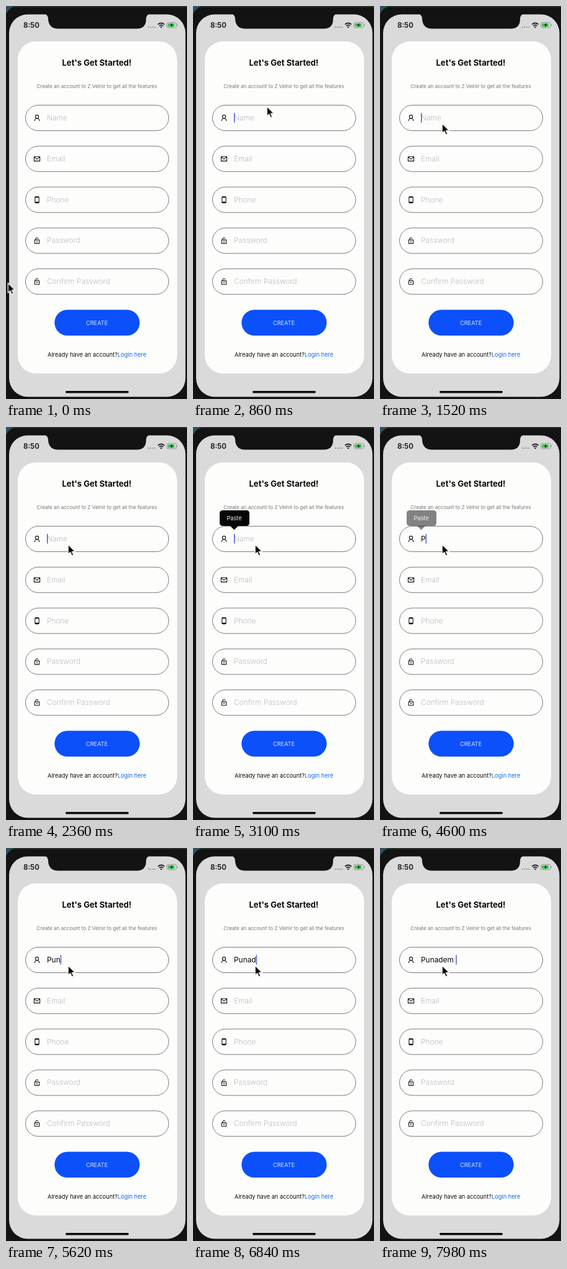
Animation of 292 by 632 pixels, one loop 8000 ms. Source, as an HTML page:

```html
<!DOCTYPE html>
<html lang="en">
<head>
<meta charset="utf-8">
<title>Sign-up form</title>
<style>
  html, body { margin: 0; width: 100%; height: 100%; overflow: hidden; background: #131313; }
  svg { display: block; width: 292px; height: 632px; font-family: Inter, "Open Sans", sans-serif; }
  text { white-space: pre; }
  .mid { text-anchor: middle; }
  .box { fill: none; stroke: #7c7c82; stroke-width: 1; }
  .hint { font-size: 11.9px; font-weight: 300; fill: #bdbdc4; }
  .icon { fill: none; stroke: #151515; stroke-width: 1.1; }
  #typed { font-size: 11.9px; fill: #080808; }
</style>
</head>
<body>
<svg viewBox="0 0 292 632">
  <defs>
    <g id="user"><circle cy="-2" r="2.6"/><path d="M-3.8 5C-3.8 2-2 .8 0 .8S3.8 2 3.8 5"/></g>
    <g id="mail"><path d="M-4.6-3.6H4.6V3.6H-4.6ZM-4.6-3.2L0 .6L4.6-3.2"/></g>
    <g id="phone"><rect x="-3.2" y="-4.8" width="6.4" height="9.8" rx="1"/><path d="M-3-4.2H3M-3 4H3" stroke-width="1.6"/></g>
    <g id="lock"><rect x="-3.8" y="-1.3" width="7.6" height="5.8" rx=".7"/><path d="M-2.3-1.3V-2.6A2.3 2.3 0 0 1 2.1-3.3M-1.6 1.6H1.6"/></g>
  </defs>

  <rect width="292" height="632" fill="#131313"/>
  <rect width="292" height="2" fill="#29302c"/>
  <path d="M0 0H14Q4 4 0 13Z" fill="#2d525c"/>
  <rect x="5" y="13.5" width="284.5" height="615" rx="30" fill="#dadadb"/>
  <path d="M62 12.5Q68 14 68 21Q69 36.4 84 36.4H211Q226 36.4 226 21Q226 14 232 12.5Z" fill="#131313"/>

  <text x="28" y="35" font-size="11.6" font-weight="600" fill="#111">8:50</text>
  <path d="M229 34H242" stroke="#9c9c9e" stroke-width="2" stroke-dasharray="2 1.4"/>
  <g fill="none" stroke="#111" stroke-width="1.6">
    <path d="M245.2 29.6Q250.4 25.2 255.6 29.6M247.2 32Q250.4 29.4 253.6 32"/>
    <path d="M249 33.6H251.8L250.4 35.2Z" stroke-width=".6" fill="#111"/>
  </g>
  <rect x="259.5" y="26.5" width="15.5" height="8.5" rx="2.4" fill="none" stroke="#909092" stroke-width=".9"/>
  <rect x="261" y="28" width="11" height="5.5" rx="1.2" fill="#3fc653"/>
  <path d="M276.5 29.5V32" stroke="#909092" stroke-width="1.2"/>
  <path d="M268 27L265 31.2H267L266.2 34.6L269.4 30.2H267.4Z" fill="#111"/>

  <rect x="19" y="57" width="257" height="534" rx="29" fill="#fdfdfc"/>
  <text class="mid" x="146.5" y="96" font-size="13.1" font-weight="700" fill="#080808">Let's Get Started!</text>
  <text class="mid" x="146.5" y="132" font-size="8.1" fill="#77777a">Create an account to Z Velnir to get all the features</text>
  <g id="fields"></g>

  <rect x="78.3" y="488.5" width="137.4" height="41.5" rx="20.75" fill="#0b50fb"/>
  <text class="mid" x="146.6" y="512.5" font-size="9.2" fill="#d9e2fb">CREATE</text>
  <text x="67" y="564" font-size="9.25" fill="#0c0c0c">Already have an account?<tspan fill="#0f68ee">Login here</tspan></text>
  <rect x="96" y="619" width="102" height="3.4" rx="1.7" fill="#0c0c0c"/>

  <text id="typed" x="66" y="184"></text>
  <rect id="caret" y="172" width="1.5" height="15.5" fill="#4a62dc"/>
  <g id="popup">
    <path d="M48 134H86Q91 134 91 139V154Q91 159 86 159H73L66.5 165.5L60 159H48Q43 159 43 154V139Q43 134 48 134Z" fill="#050505"/>
    <text class="mid" x="66.5" y="150" font-size="9.2" fill="#ececec">Paste</text>
  </g>
  <g id="mouse">
    <path d="M0 0V15.8L3.6 12.4L6 18.2L8.8 17L6.4 11.4H11.3Z" fill="#080808" stroke="#fdfdfc" stroke-width="1.3" stroke-linejoin="round"/>
  </g>
</svg>
<script>
const LOOP = 8000;
const NAME = 'Punadem ';
const FOCUS_AT = 840;
const KEY_TIMES = [4520, 4960, 5400, 6000, 6400, 6840, 7240, 7660];
const FIELDS = [['Name', 'user'], ['Email', 'mail'], ['Phone', 'phone'], ['Password', 'lock'], ['Confirm Password', 'lock']];
const $ = id => document.getElementById(id);

$('fields').innerHTML = FIELDS.map(([label, icon], i) => `
  <g transform="translate(0 ${180 + i * 65.8})">
    <rect class="box" x="31.5" y="-20.5" width="231" height="41" rx="20.5"/>
    <use class="icon" href="#${icon}" x="50"/>
    <text class="hint" x="66" y="4">${label}</text>
  </g>`).join('');
const nameHint = document.querySelector('.hint');

// Each step: [time, style, easing to the next step]
const play = (id, steps) => $(id).animate(
  steps.map(([time, style, easing = 'linear']) => ({ offset: time / LOOP, easing, ...style })),
  { duration: LOOP, iterations: Infinity });
const at = (x, y) => ({ transform: `translate(${x}px, ${y}px)` });
const alpha = opacity => ({ opacity });

const clock = play('mouse', [
  [0, at(3.2, 445.5)],
  [40, at(3.2, 445.5), 'ease-in-out'],
  [780, at(119.2, 161.5)],
  [1000, at(119.2, 161.5), 'ease-in-out'],
  [1540, at(100.2, 189)],
  [LOOP, at(100.2, 189)]
]);
const popup = play('popup', [
  [0, alpha(0)],
  [2680, alpha(0)],
  [2800, alpha(1)],
  [4520, alpha(1)],
  [4680, alpha(0)],
  [LOOP, alpha(0)]
]);
clock.startTime = popup.startTime = document.timeline.currentTime;

function draw() {
  const time = (clock.currentTime || 0) % LOOP;
  const count = KEY_TIMES.filter(key => key <= time).length;
  const typed = $('typed');
  typed.textContent = NAME.slice(0, count);
  nameHint.style.visibility = count ? 'hidden' : 'visible';
  $('caret').style.visibility = time < FOCUS_AT ? 'hidden' : 'visible';
  $('caret').setAttribute('x', 66 + (count ? typed.getComputedTextLength() : 0));
  requestAnimationFrame(draw);
}
draw();
</script>
</body>
</html>
```
